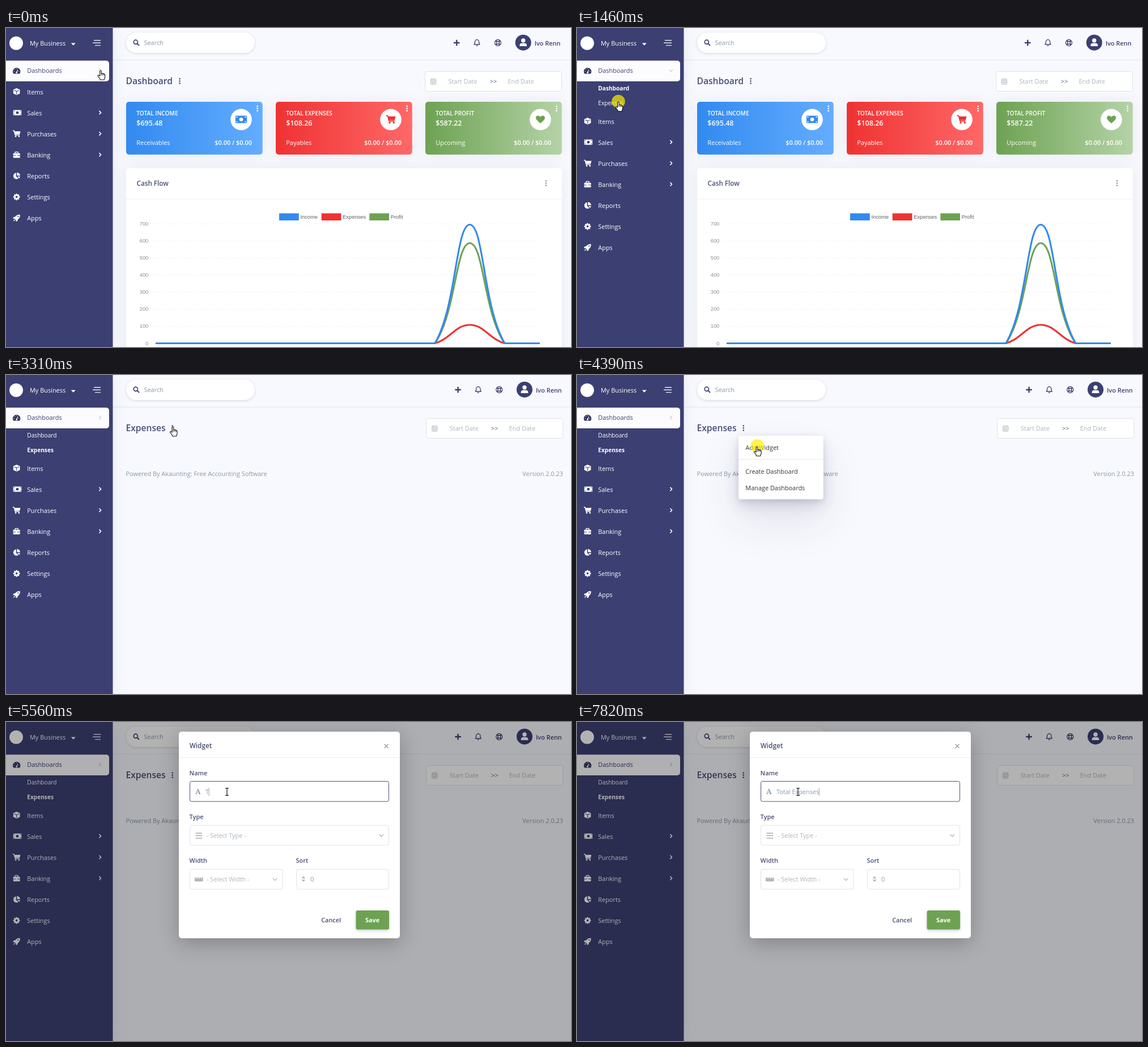
Write an HTML page with a canvas that moves like this. It is 997x562 px and loops after 8000 ms.

```html
<!DOCTYPE html>
<html lang="en">
<head>
<meta charset="utf-8">
<title>Dashboard</title>
<style>
  html, body { margin: 0; width: 100%; height: 100%; overflow: hidden; background: #f8f9fe; }
  canvas { display: block; }
</style>
</head>
<body>
<canvas id="stage" width="997" height="562"></canvas>
<script>
const ctx = document.getElementById('stage').getContext('2d');
const LOOP = 8000;
const NAVY = '#3c3f72', HEAD = '#484e76', MUTED = '#8898aa', PALE = '#adb5bd', LINE = '#dee2e6';
const BLUE = '#328aef', RED = '#ef3232', GREEN = '#6da252', PAGE = '#f8f9fe';
const SOFT = ['rgba(136,152,170,.15)', 25, 0];
const SANS = '"Open Sans", sans-serif';

// ---- helpers ----
// y is the middle of the capital letters
function text(s, x, y, color, size = 10.92, weight = 400, align = 'left', family = SANS) {
  ctx.font = `${weight} ${size}px ${family}`;
  ctx.textAlign = align;
  ctx.fillStyle = color;
  ctx.fillText(s, x, y + size * 0.357);
}

function box(x, y, w, h, r, fill, shadow, border) {
  ctx.save();
  ctx.beginPath();
  ctx.roundRect(x, y, w, h, r);
  if (shadow) [ctx.shadowColor, ctx.shadowBlur, ctx.shadowOffsetY] = shadow;
  ctx.fillStyle = fill;
  ctx.fill();
  ctx.restore();
  if (border) {
    ctx.strokeStyle = border;
    ctx.lineWidth = 1;
    ctx.stroke();
  }
}

function disc(x, y, r, color) {
  ctx.beginPath();
  ctx.arc(x, y, r, 0, Math.PI * 2);
  ctx.fillStyle = color;
  ctx.fill();
}

function ring(x, y, r, color, width) {
  ctx.beginPath();
  ctx.arc(x, y, r, 0, Math.PI * 2);
  ctx.strokeStyle = color;
  ctx.lineWidth = width;
  ctx.stroke();
}

function fill(d, color) {
  ctx.fillStyle = color;
  ctx.fill(new Path2D(d));
}

function stroke(d, color, width = 1) {
  ctx.strokeStyle = color;
  ctx.lineWidth = width;
  ctx.stroke(new Path2D(d));
}

function at(x, y, draw, scale = 1, angle = 0) {
  ctx.save();
  ctx.translate(x, y);
  ctx.rotate(angle);
  ctx.scale(scale, scale);
  draw();
  ctx.restore();
}

function dots(x, y, color, r = 1.4) {
  for (const d of [-4, 0, 4]) disc(x, y + d, r, color);
}

function chevron(x, y, color, angle = 0, width = 1.6) {
  at(x, y, () => stroke('M-1.6-3.2 1.6 0-1.6 3.2', color, width), 1, angle);
}

// progress of a change that shows n pictures from time a to time b
function steps(t, a, b, n) {
  if (t < a) return 0;
  return Math.min(n, Math.floor((t - a + 6) / ((b - a) / (n - 1))) + 1) / n;
}
const ease = p => 0.6 * p + 0.4 * p * p * (3 - 2 * p);
const mix = (a, b, p) => a + (b - a) * p;

// ---- icons, centred on 0,0 ----
const icons = {
  gauge(c, bg) {
    fill('M-5.6 4.6A6.7 6.7 0 1 1 5.6 4.6Z', c);
    stroke('M0 2.2 2.4-2.4', bg, 1.2);
    disc(0, 2.4, 1.5, bg);
    for (const [x, y] of [[-4.2, 1], [-3, -2.4], [0, -4], [4.2, 1]]) disc(x, y, 0.7, bg);
  },
  cube(c, bg) {
    fill('M0-6 5.8-3.7V3.5L0 6-5.8 3.5V-3.7Z', c);
    stroke('M-4.2-2.4 0-.7 4.2-2.4M0-.7V4.6', bg, 1.1);
  },
  bill(c, bg) {
    box(-7.2, -4.6, 14.4, 9.2, 1, c);
    disc(0, 0, 2.4, bg);
    for (const x of [-5.4, 5.4]) for (const y of [-2.9, 2.9]) disc(x, y, 0.8, bg);
  },
  cart(c) {
    stroke('M-6.8-5.3H-4.5L-2.5 2.3H5.2', c, 1.4);
    fill('M-4.2-4.2H6.8L5.4 1.2H-2.8Z', c);
    disc(-1.6, 4.6, 1.4, c);
    disc(4.2, 4.6, 1.4, c);
  },
  bag(c, bg) {
    box(-6, -3, 12, 8.3, 1.2, c);
    stroke('M-2.4-3V-5H2.4V-3', c, 1.4);
    stroke('M-6 1.3H-1.4M1.4 1.3H6', bg, 0.9);
  },
  pie(c) {
    fill('M-.9-5.5A5.7 5.7 0 1 0 3.2 4.8L-.9 .7Z', c);
    fill('M.7-6A5.9 5.9 0 0 1 6.3-.5H.7Z', c);
    fill('M1.2 1H6.3A5.7 5.7 0 0 1 4.5 4.4Z', c);
  },
  cog(c, bg) {
    for (let i = 0; i < 8; i++) at(0, 0, () => box(-1.3, -5.9, 2.6, 4, 0.6, c), 1, i * Math.PI / 4);
    disc(0, 0, 4.4, c);
    disc(0, 0, 1.8, bg);
  },
  rocket(c, bg) {
    fill('M6-6C2-6.4-.5-5-2.5-2.2L-5.4-1.6-6.4 1-3.6 1.2-1.2 3.6-1 6.4 1.6 5.4 2.2 2.5C5 .5 6.4-2 6-6Z', c);
    fill('M-4 2.4-6 6-2.4 4Z', c);
    disc(2.6, -2.6, 1.1, bg);
  },
  heart(c) {
    fill('M0 7C-7.6 .8-8.8-1.4-7.6-4.4-6-7.2-2-7 0-4 2-7 6-7.2 7.6-4.4 8.8-1.4 7.6 .8 0 7Z', c);
  },
  search(c) {
    ring(-1.2, -1.2, 3.6, c, 1.7);
    stroke('M1.6 1.6 5 5', c, 2);
  },
  bell(c) {
    stroke('M-5 3C-3.5 1.6-3.8-.4-3.5-1.8A3.5 3.5 0 0 1 3.5-1.8C3.8-.4 3.5 1.6 5 3ZM0-5V-6.2', c, 1.3);
    fill('M-1.6 4.4A1.6 1.7 0 0 0 1.6 4.4Z', c);
  },
  buoy(c) {
    ring(0, 0, 5.5, c, 1.3);
    ring(0, 0, 2.5, c, 1.3);
    stroke('M-3.8-3.8-1.8-1.8M3.8-3.8 1.8-1.8M-3.8 3.8-1.8 1.8M3.8 3.8 1.8 1.8', c, 2.2);
  },
  calendar(c) {
    box(-4.5, -4, 9, 9, 1, '#fff', null, c);
    stroke('M-4.5-1.5H4.5M-2.2-5.6V-3M2.2-5.6V-3M-4.5 1.6H4.5M-1.5-1.5V5M1.5-1.5V5', c, 0.8);
  }
};
const icon = (name, x, y, c, bg, scale) => at(x, y, () => icons[name](c, bg), scale);

// ---- page parts ----
function navbar(dx) {
  ctx.fillStyle = '#e3e5ed';
  ctx.fillRect(188, 56, 809, 1);
  box(212, 8, 227, 36, 18, '#fff', ['rgba(50,50,93,.18)', 4, 1]);
  icon('search', 230, 26, NAVY);
  text('Search', 243.5, 26.5, MUTED);
  stroke(`M${790 + dx} 26H${800.5 + dx}M${795.3 + dx} 20.8V31.2`, NAVY, 2.4);
  icon('bell', 831 + dx, 26, NAVY);
  icon('buoy', 868 + dx, 26, NAVY);
  disc(912.7 + dx, 25.7, 14, NAVY);
  disc(912.7 + dx, 22, 3.7, '#fff');
  at(912.7 + dx, 25.7, () => fill('M-6.3 6.3V4.6C-6.3 2.4-4.6 1-2.8 1H2.8C4.6 1 6.3 2.4 6.3 4.6V6.3Z', '#fff'));
  text('Ivo Renn', 932.7 + dx, 26.7, NAVY, 10.92, 600);
}

function heading(title, dotX, dx) {
  text(title, 211.5, 93.5, HEAD, 15.6, 600);
  dots(dotX, 93.5, NAVY, 1.3);
  box(739.5 + dx, 76.5, 241, 35, 3, '#fff', null, LINE);
  icon('calendar', 754 + dx, 94, PALE);
  text('Start Date', 780.5 + dx, 94.3, PALE);
  text('>>', 853.8 + dx, 94.3, '#525f7f');
  text('End Date', 885.5 + dx, 94.3, PALE);
}

const cards = [
  ['TOTAL INCOME', '$695.48', 'Receivables', BLUE, '#63adff', 'bill', 1.4],
  ['TOTAL EXPENSES', '$108.26', 'Payables', RED, '#ff6868', 'cart', 1.25],
  ['TOTAL PROFIT', '$587.22', 'Upcoming', GREEN, '#b5d3a7', 'heart', 1]
];

function card([title, sum, note, from, to, name, scale], i) {
  const x = 212 + 264 * i;
  const g = ctx.createLinearGradient(x, 0, x + 241, 0);
  g.addColorStop(0, from);
  g.addColorStop(1, to);
  box(x, 130, 240.7, 93, 5, g, SOFT);
  text(title, x + 18.3, 150.3, '#fff', 10.14, 600);
  text(sum, x + 18.3, 167.3, '#fff', 12.48, 600);
  text(note, x + 18.3, 202, '#fff');
  text('$0.00 / $0.00', x + 222, 202, '#fff', 10.92, 600, 'right');
  disc(x + 203, 161.3, 18.8, '#fff');
  icon(name, x + 203, 161, from, '#fff', scale);
  dots(x + 231.6, 141.8, '#fff');
}

const BASE = 555.5, TOP = 345, px = i => 264 + 61.6 * i;

function curve(peak, color) {
  const pt = i => [px(i), BASE - (i === 9 ? peak * 0.3006 : 0)];
  const cap = y => Math.min(BASE, Math.max(TOP - 0.5, y));
  const handle = (i, dir) => {
    const p = pt(Math.max(0, i - 1)), c = pt(i), n = pt(Math.min(11, i + 1));
    const a = Math.hypot(c[0] - p[0], c[1] - p[1]), b = Math.hypot(n[0] - c[0], n[1] - c[1]);
    const k = dir * 0.4 * (dir > 0 ? b : a) / (a + b);
    return [c[0] + k * (n[0] - p[0]), cap(c[1] + k * (n[1] - p[1]))];
  };
  ctx.beginPath();
  ctx.moveTo(...pt(0));
  for (let i = 0; i < 11; i++) ctx.bezierCurveTo(...handle(i, 1), ...handle(i + 1, -1), ...pt(i + 1));
  ctx.strokeStyle = color;
  ctx.lineWidth = 3.1;
  ctx.lineJoin = 'round';
  ctx.stroke();
}

function chart() {
  const arial = '"Liberation Sans", sans-serif';
  box(212, 247, 768.7, 340, 5, '#fff', SOFT);
  stroke('M212 301.5H980.7', '#eef0f4');
  text('Cash Flow', 230.5, 274, HEAD, 11.7, 600);
  dots(953, 273.3, MUTED, 1.3);
  [['Income', BLUE, 482], ['Expenses', RED, 556.7], ['Profit', GREEN, 641.3]].forEach(([s, c, x]) => {
    ctx.fillStyle = c;
    ctx.fillRect(x, 326.5, 34.7, 12.5);
    text(s, x + 37.4, 332.2, '#606060', 9.36, 400, 'left', arial);
  });
  for (let v = 0; v <= 700; v += 100) {
    const y = BASE - v * 0.3006;
    text(String(v), 251.3, y - 0.3, '#8d8d8d', 9.36, 400, 'right', arial);
    ctx.setLineDash([2, 2]);
    stroke(`M258 ${y}H942`, '#f0f1f4');
    ctx.setLineDash([]);
  }
  curve(587.22, GREEN);
  curve(108.26, RED);
  curve(695.48, BLUE);
}

const menu = [
  ['Items', 'cube'], ['Sales', 'bill', true], ['Purchases', 'cart', true], ['Banking', 'bag', true],
  ['Reports', 'pie'], ['Settings', 'cog'], ['Apps', 'rocket']
];

function sidebar(open, turn, onExpenses) {
  box(0, 0, 188.5, 562, 0, NAVY, SOFT);
  disc(18, 26.7, 12, '#fff');
  text('My Business', 42, 27.5, '#fff');
  fill('M114.8 26.6H122.8L118.8 30.8Z', '#fff');
  stroke('M155 21.8H167M153 26.2H167M157 30.6H167', '#e6e6ef', 1.4);

  box(-6, 57.5, 188, 36.5, 5, '#fcfcfe');
  icon('gauge', 18.7, 75.8, '#2b2d5a', '#fcfcfe');
  text('Dashboards', 37.3, 75.6, NAVY);
  chevron(166, 75, '#c9cbd6', turn * Math.PI / 2, 1.3);

  ctx.save();
  ctx.beginPath();
  ctx.rect(0, 94, 188, 52 * open);
  ctx.clip();
  text('Dashboard', 37.3, 106.2, '#fff', 10.14, onExpenses ? 400 : 700);
  text('Expenses', 37.3, 132.2, '#fff', 10.14, onExpenses ? 700 : 400);
  ctx.restore();

  menu.forEach(([label, name, more], i) => {
    const y = 112.8 + 37.1 * i + 52 * open;
    icon(name, name === 'bill' ? 20 : 18.7, y - 0.7, '#fff', NAVY);
    text(label, 37.3, y, '#fff');
    if (more) chevron(166, y - 0.8, '#fff');
  });
}

function dropdown(alpha) {
  ctx.save();
  ctx.globalAlpha = alpha;
  const shadows = [['rgba(50,50,93,.1)', 78, 39], ['rgba(50,50,93,.15)', 27, 12], ['rgba(0,0,0,.1)', 12, 4]];
  for (const s of shadows) box(285, 107, 149.5, 111.7, 4, '#fff', s);
  stroke('M285 148.5H434.5', '#e6e8ec');
  text('Add Widget', 297.3, 128, '#32363b');
  text('Create Dashboard', 297.3, 170, '#32363b');
  text('Manage Dashboards', 297.3, 198.8, '#32363b');
  ctx.restore();
}

function modal(focus, typed) {
  ctx.fillStyle = 'rgba(0,0,0,.3)';
  ctx.fillRect(0, 0, 997, 562);
  box(305, 17, 390, 364, 5, '#fff', ['rgba(0,0,0,.25)', 36, 8]);
  text('Widget', 323.8, 42, HEAD, 11.7, 600);
  stroke('M667.5 39 674.5 46M674.5 39 667.5 46', MUTED, 1.2);
  stroke('M305 62.5H695', '#e9ecef');
  for (const [s, x, y] of [['Name', 323.6, 90], ['Type', 323.6, 167.5], ['Width', 323.6, 244.5], ['Sort', 511.6, 244.5]])
    text(s, x, y, HEAD, 10.92, 600);

  box(324.5, 104.5, 351, 35.5, 3, '#fff', null, focus ? '#4c4f83' : LINE);
  box(324.5, 182, 351, 35, 3, '#fff', null, LINE);
  box(324.5, 259.5, 163.5, 35, 3, '#fff', null, LINE);
  box(512.5, 259.5, 163, 35, 3, '#fff', null, LINE);

  text('A', 338.8, 122.6, focus ? MUTED : PALE, 12.5, 700, 'center', '"Noto Serif", serif');
  if (typed) {
    text(typed, 352, 123.2, MUTED);
    ctx.fillRect(352 + ctx.measureText(typed).width - 0.4, 116, 0.9, 14);
  } else {
    text('Enter Name', 352, 123.2, PALE);
  }

  stroke('M334.5 195.8H346M334.5 200.2H346M334.5 204.6H346', PALE, 1.7);
  text('- Select Type -', 354, 200.3, PALE);
  stroke('M658.5 198 662.3 202 666.1 198', PALE, 1.2);
  box(333, 274, 14.6, 6.8, 1, PALE);
  stroke('M335.5 274V276.5M338.5 274V276.5M341.5 274V276.5M344.5 274V276.5', '#fff', 0.9);
  text('- Select Width -', 354, 277.3, PALE);
  stroke('M470.7 275.2 474.5 279.2 478.3 275.2', PALE, 1.2);
  fill('M521.6 275.4 525 271.6 528.4 275.4ZM521.6 277.8 525 281.6 528.4 277.8Z', PALE);
  text('0', 537, 277.3, MUTED);

  text('Cancel', 573.6, 349, HEAD, 10.92, 600, 'center');
  box(617.5, 332, 58.5, 33.5, 3, GREEN, ['rgba(50,50,93,.25)', 5, 2]);
  text('Save', 646.6, 349, '#fff', 10.92, 700, 'center');
}

// ---- pointer ----
const moves = [
  [690, 1310, 9, 73, 130], [1840, 1841, 2, 75, 133], [2690, 3310, 9, 294.5, 91],
  [3930, 4240, 5, 317.5, 126], [4790, 5100, 5, 390, 123]
];
const clicks = [[80, 230, 166.5, 74], [1460, 1610, 73, 129.5], [3460, 3630, 294.5, 91], [4390, 4470, 318, 125]];

function pointer(t) {
  let x = 167, y = 74.5;
  for (const [a, b, n, tx, ty] of moves) {
    const p = ease(steps(t, a, b, n));
    x = mix(x, tx, p);
    y = mix(y, ty, p);
  }
  for (const [a, b, cx, cy] of clicks)
    if (t >= a && t < b) disc(cx, cy, 11.8, 'rgba(255,238,0,.7)');

  let kind = 'hand';
  if (t >= 4470) kind = x > 324 ? 'beam' : 'arrow';
  else if (t >= 3930) kind = y > 103 && y < 113 ? 'arrow' : 'hand';
  else if (x > 188 && x < 285) kind = 'arrow';

  at(x, y, () => {
    ctx.lineJoin = 'round';
    if (kind === 'beam') {
      stroke('M-2.8-6.4H-.8L0-5.8 .8-6.4H2.8M0-5.8V5.8M-2.8 6.4H-.8L0 5.8 .8 6.4H2.8', '#111', 1.2);
      return;
    }
    const d = kind === 'arrow'
      ? 'M.4 .4V12.4L3 9.9 4.9 14.2 6.9 13.3 5 9.1H8.8Z'
      : 'M-1.3 10V1.5C-1.3-.2 1.3-.2 1.3 1.5V6C1.6 4.9 3.6 5.2 3.7 6.3 4.2 5.5 5.8 5.8 5.9 7 6.6 6.4 7.6 6.9 7.6 8V11.5C7.6 13.4 6.4 14.4 6.2 16.8H-.6C-1.2 14.2-3.4 12.4-4.8 10-5.3 8.8-4 8-3 8.8Z';
    fill(d, '#fff');
    stroke(d, '#111', 1.1);
    if (kind === 'hand') stroke('M1.3 6V9M3.7 6.5V9M5.9 7.2V9', '#111', 0.9);
  });
}

// ---- timeline ----
const keys = [5560, 5790, 5870, 6020, 6170, 6250, 6800, 7030, 7100, 7270, 7340, 7420, 7650, 7820];

function draw(t) {
  const expenses = t >= 1840, dx = expenses ? 2.3 : 0;
  const open = ease(steps(t, 230, 540, 5));
  ctx.fillStyle = PAGE;
  ctx.fillRect(0, 0, 997, 562);
  navbar(dx);
  heading(expenses ? 'Expenses' : 'Dashboard', expenses ? 293.7 : 306.5, dx);
  if (expenses) {
    text('Powered By Akaunting: Free Accounting Software', 211.5, 174.5, MUTED);
    text('Version 2.0.23', 983, 174.5, MUTED, 10.92, 400, 'right');
  } else {
    cards.forEach(card);
    chart();
  }
  sidebar(open, expenses ? 0 : open, expenses);
  if (t >= 3630 && t < 4470) dropdown(t < 3700 ? 0.5 : 1);
  if (t >= 4470) modal(t >= 5100, 'Total Expenses'.slice(0, keys.filter(k => t >= k).length));
  pointer(t);
}

function tick(now) {
  draw(now % LOOP);
  requestAnimationFrame(tick);
}
draw(0);
requestAnimationFrame(tick);
</script>
</body>
</html>
```
